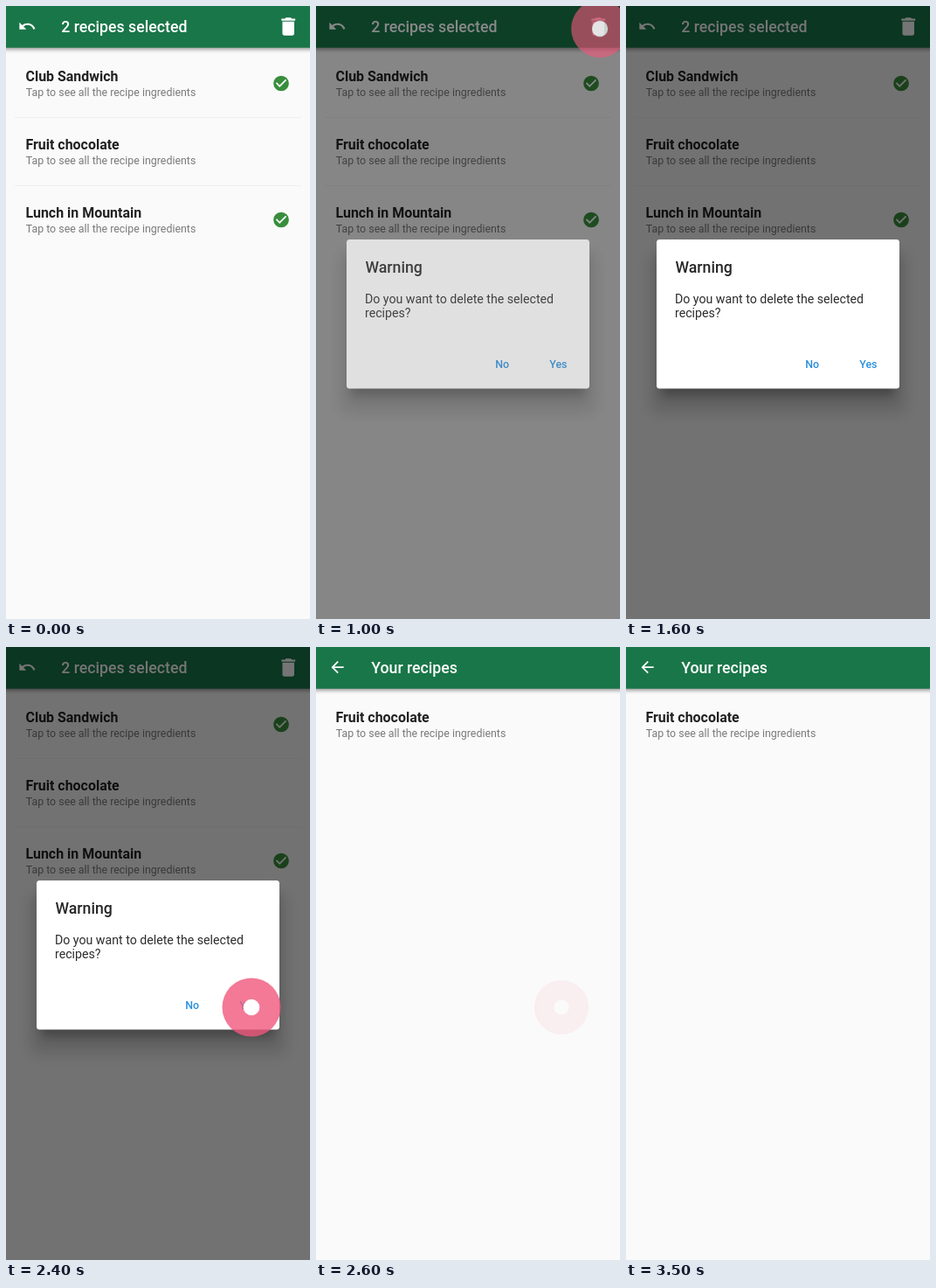
An HTML page for the animation above (3600 ms loop, 348x701 px).

```html
<!DOCTYPE html>
<html lang="en">
<head>
<meta charset="utf-8">
<title>Recipe list</title>
<style>
  html, body { margin: 0; width: 100%; height: 100%; overflow: hidden; background: #fafafa; }
  svg { display: block; width: 100%; height: 100%; }
  text { font-family: Roboto, sans-serif; }
  .bar { font-size: 17.7px; font-weight: 500; fill: #fff; }
  .name { font-size: 15.94px; font-weight: 700; fill: #212121; }
  .hint { font-size: 12.4px; fill: #7a7a7a; }
  .heading { font-size: 17.7px; font-weight: 500; fill: #272727; }
  .body { font-size: 14.17px; fill: #2c2c2c; }
  .action { font-size: 12.4px; font-weight: 500; fill: #2b8fdc; }
  .icon { fill: #fff; }
</style>
</head>
<body>
<svg viewBox="0 0 348 701" preserveAspectRatio="none">
  <rect width="348" height="701" fill="#fafafa"/>
  <rect y="-6" x="-12" width="372" height="56" opacity=".36" style="filter:blur(2px)"/>
  <rect width="348" height="47.7" fill="#197648"/>
  <g id="selection"></g>
  <g id="remaining"></g>
  <rect id="scrim" width="348" height="701"/>
  <g id="dialog">
    <rect x="28" y="283" width="292" height="182" rx="8" opacity=".13" style="filter:blur(8px)"/>
    <rect x="40" y="278" width="268" height="168" rx="6" opacity=".28" style="filter:blur(6px)"/>
    <rect x="35" y="267" width="278" height="170.5" rx="3.5" fill="#fff"/>
    <text class="heading" x="56.5" y="305">Warning</text>
    <text class="body" x="56" y="339.5">Do you want to delete the selected</text>
    <text class="body" x="56" y="356.3">recipes?</text>
    <text class="action" x="205.3" y="414">No</text>
    <text class="action" x="267.3" y="414">Yes</text>
  </g>
  <g id="touch">
    <circle r="33.5" fill="#f0587c" fill-opacity=".8"/>
    <circle r="9.3" fill="#fff"/>
  </g>
</svg>
<script>
const LOOP = 3600, STEP = 100, DP = 0.8855;
const TAPS = [{ at: 950, x: 325, y: 26 }, { at: 2400, x: 281, y: 412 }];
const ICONS = {
  undo: 'M12.5 8c-2.65 0-5.05.99-6.9 2.6L2 7v9h9l-3.62-3.62c1.39-1.16 3.16-1.88 5.12-1.88 3.54 0 6.55 2.31 7.6 5.5l2.37-.78C21.08 11.03 17.15 8 12.5 8z',
  back: 'M20 11H7.83l5.59-5.59L12 4l-8 8 8 8 1.41-1.41L7.83 13H20v-2z',
  trash: 'M6 19c0 1.1.9 2 2 2h8c1.1 0 2-.9 2-2V7H6v12zM19 4h-3.5l-1-1h-5l-1 1H5v2h14V4z',
  check: 'M12 2a10 10 0 1 0 0 20a10 10 0 1 0 0-20zm-2 15l-5-5 1.41-1.41L10 14.17l7.59-7.59L19 8l-9 9z'
};
const byId = id => document.getElementById(id);
const clamp = v => Math.min(1, Math.max(0, v));

const icon = (name, x, y, scale = DP, fill = '#fff') =>
  `<path fill="${fill}" fill-rule="evenodd" d="${ICONS[name]}" transform="translate(${x} ${y}) scale(${scale}) translate(-12 -12)"/>`;

const title = text => `<text class="bar" x="63.3" y="29.8">${text}</text>`;

const recipe = (name, row, checked) => {
  const y = row * 78;
  return `<text class="name" x="22.5" y="${y + 85.5}">${name}</text>
    <text class="hint" x="22.7" y="${y + 102.8}">Tap to see all the recipe ingredients</text>
    ${checked ? icon('check', 315, y + 88.5, DP, '#388e3c') : ''}`;
};

const divider = y => `<rect x="10" y="${y}" width="328" height="1" fill="#efefef"/>`;

byId('selection').innerHTML = icon('undo', 24.2, 23.2) + title('2 recipes selected') +
  icon('trash', 323.2, 23.5, 1.13) + recipe('Club Sandwich', 0, true) + divider(127) +
  recipe('Fruit chocolate', 1, false) + divider(205) + recipe('Lunch in Mountain', 2, true);
byId('remaining').innerHTML = icon('back', 24.6, 23.2) + title('Your recipes') +
  recipe('Fruit chocolate', 0, false);

function render(now) {
  const t = Math.floor((now % LOOP) / STEP) * STEP;
  const deleted = t >= 2600;
  byId('selection').style.display = deleted ? 'none' : '';
  byId('remaining').style.display = deleted ? '' : 'none';

  const shown = t < 1000 ? 0 : Math.min(clamp((t - 925) / 100), clamp((2560 - t) / 120));
  byId('dialog').setAttribute('opacity', shown);
  byId('scrim').setAttribute('opacity', 0.54 * Math.sqrt(shown));

  const tap = t < 2400 ? TAPS[0] : TAPS[1];
  const age = t - tap.at;
  const strength = age < 0 ? 0 : clamp(1 - age / 220);
  byId('touch').setAttribute('opacity', strength);
  byId('touch').setAttribute('transform',
    `translate(${tap.x} ${tap.y}) scale(${0.92 + 0.08 * strength})`);
}

function loop(now) {
  render(now);
  requestAnimationFrame(loop);
}
render(0);
requestAnimationFrame(loop);
</script>
</body>
</html>
```
